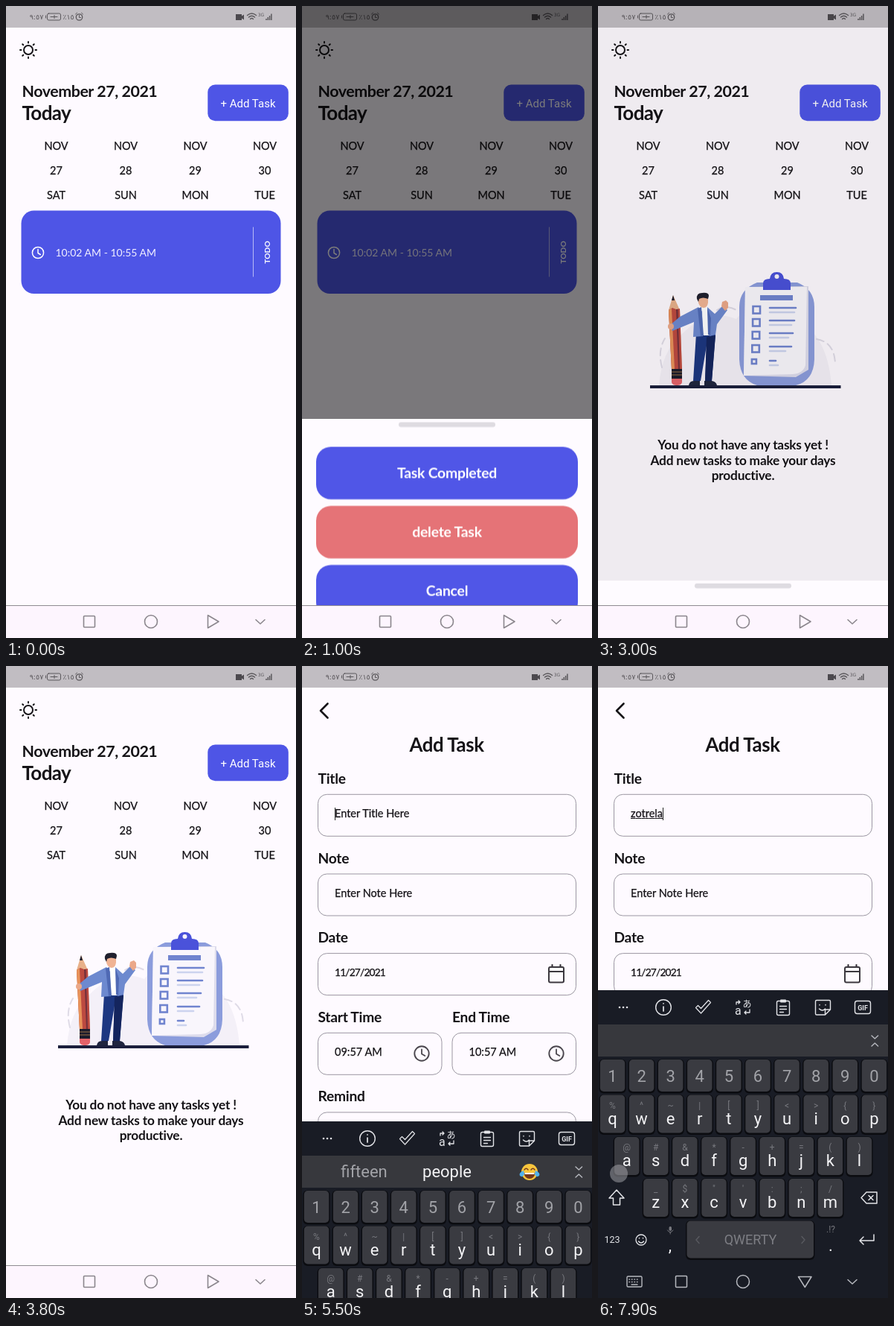
Write an HTML page that moves like this. It is 390 px wide and 848 px high and loops after 8000 ms.

```html
<!DOCTYPE html>
<html lang="en">
<head>
<meta charset="utf-8">
<title>Task planner</title>
<style>
html, body { margin: 0; width: 100%; height: 100%; overflow: hidden; background: #fefaff; }
svg { position: absolute; left: 0; top: 0; width: 390px; height: 848px; }
text, #typed { font-family: Lato, "Open Sans", sans-serif; font-size: 14.5px; }
text { white-space: pre; fill: #151317; }
.mid { text-anchor: middle; }
.bold { font-weight: 700; }
.body { stroke: #151317; stroke-width: .25px; }
.date { font-size: 21.4px; letter-spacing: -.44px; }
.today { font-size: 26px; letter-spacing: -.6px; }
.title { font-size: 25.8px; letter-spacing: -.4px; }
.label { font-size: 19.2px; letter-spacing: -.25px; }
.btn { font-size: 19.4px; letter-spacing: -.25px; fill: #fff; }
.empty { font-size: 17.3px; letter-spacing: -.2px; }
.num { font-size: 13.8px; letter-spacing: -.85px; }
.add { font: 15px Roboto, sans-serif; fill: #fff; }
.sys { font: 9.5px "DejaVu Sans", sans-serif; fill: #5b585c; }
.key { font: 22px Roboto, sans-serif; fill: #f4f4f6; }
.dim { fill: #a2a3a8; }
.hint { font: 12px Roboto, sans-serif; fill: #77787e; }
.line { fill: none; stroke-linecap: round; stroke-linejoin: round; }
.field { fill: none; stroke: #9b97a2; }

.loop { animation: 8s linear infinite; }
#scrim { animation-name: scrim; }
#sheet { animation-name: sheet; }
#card { animation-name: card; animation-timing-function: step-end; }
#none { animation-name: none-yet; animation-timing-function: step-end; }
#page { animation: rise 8s infinite, fade 8s infinite; }
#keys { animation-name: keys; }
.idle { animation-name: idle; animation-timing-function: step-end; }
#caret { animation-name: caret; animation-timing-function: step-end; }

@keyframes scrim {
  0%, 9.75% { opacity: 0; animation-timing-function: ease; }
  13.5% { opacity: 1; }
  34.375% { opacity: 1; animation-timing-function: ease-in-out; }
  38.45%, 100% { opacity: 0; }
}
@keyframes sheet {
  0%, 10.5% { transform: translateY(314px); animation-timing-function: cubic-bezier(0, 0, .2, 1); }
  15% { transform: none; }
  34.375% { transform: none; animation-timing-function: ease-in-out; }
  38.45%, 100% { transform: translateY(314px); }
}
@keyframes card { 0% { opacity: 1; } 34.75%, 100% { opacity: 0; } }
@keyframes none-yet { 0% { opacity: 0; } 34.75%, 100% { opacity: 1; } }
@keyframes rise {
  0%, 52% { transform: translateY(212px); animation-timing-function: cubic-bezier(.4, 0, .2, 1); }
  57%, 100% { transform: none; }
}
@keyframes fade {
  0%, 52% { opacity: 0; animation-timing-function: ease-in; }
  57%, 100% { opacity: 1; }
}
@keyframes keys {
  0%, 67.25% { transform: translateY(414px); animation-timing-function: ease-out; }
  71%, 100% { transform: none; }
}
@keyframes idle { 0% { opacity: 1; } 84.5%, 100% { opacity: 0; } }
@keyframes caret {
  0% { opacity: 0; } 65.6% { opacity: 1; } 71.9% { opacity: 0; }
  78.1%, 100% { opacity: 1; }
}

#typed { position: absolute; left: 44px; top: 188px; height: 20px; line-height: 20px; color: #151317; white-space: nowrap; -webkit-text-stroke: .25px #151317; }
#word { text-decoration: underline; }
#word span { font-size: 0; }
#caret { display: inline-block; width: 1.3px; height: 17px; background: #222; vertical-align: -4px; }
.tap { position: absolute; width: 24px; height: 24px; margin: -12px; border-radius: 50%; background: rgba(170, 170, 176, .5); opacity: 0; }
</style>
</head>
<body>
<svg viewBox="0 0 390 848">
  <rect width="390" height="848" fill="#fefaff"/>

  <g id="home">
    <g class="line" stroke="#151317" stroke-width="2">
      <circle cx="30" cy="59" r="6"/>
      <g id="rays"></g>
    </g>
    <text class="bold date" x="21.5" y="122">November 27, 2021</text>
    <text class="bold today" x="21.5" y="152.5">Today</text>
    <rect x="271.300" y="105.500" width="108.500" height="48.700" rx="10" fill="#4e55e6"/>
    <text class="add mid" x="325.5" y="135.5">+ Add Task</text>
    <g id="days"></g>

    <g id="card" class="loop">
      <rect x="20.500" y="274.500" width="349" height="111.500" rx="17" fill="#4e55e6"/>
      <g class="line" stroke="#fff" stroke-width="1.5">
        <circle cx="43" cy="331" r="7.6"/><path d="M43 326.500v5l3.300 2"/>
        <path d="M332.500 297v66" stroke-width="1" opacity=".6"/>
      </g>
      <text x="66.500" y="336" style="font-size:14px;fill:#f3f1ff">10:02 AM - 10:55 AM</text>
      <text class="bold mid" transform="translate(354.500 330.500) rotate(-90)" style="font-size:10.300px;fill:#fff">TODO</text>
    </g>

    <g id="none" class="loop">
      <path d="M82 509Q86 462 112 441Q148 404 186 420Q222 372 262 420Q308 436 314 509Z" fill="#f4f0f8"/>
      <path class="line" d="M86 485Q80 462 90 446M160 408q12-8 26 0M294 447q24 4 25 33" stroke="#dfdbe7" stroke-width="2" stroke-dasharray="10 6"/>
      <!-- clipboard -->
      <path d="M214 371H268Q291 380 291 404V474Q290 503 266 509H214Q191 502 190 474V404Q190 380 214 371Z" fill="#8b9cdc"/>
      <path d="M198 377L283 376V488L266 498L196 496Z" fill="#dddcec"/>
      <path d="M198 377H281L279 482Q276 493 262 494L196 496Z" fill="#f9f6fc"/>
      <path d="M222 381V372Q222 366 231 366Q232 357 240.500 357T250 366Q259 366 259 372V381Z" fill="#4a52da"/>
      <circle cx="240.500" cy="363" r="3" fill="#f7f4fb"/>
      <rect x="218" y="388" width="44" height="7" fill="#7084cf"/>
      <g id="checks"></g>
      <!-- pencil -->
      <path d="M101 388L95 408L99 488H113L110 408Z" fill="#e8b08a"/>
      <path d="M95 408l5-3 5 2 5-1 3 82H99Z" fill="#bd4a40"/>
      <path d="M95 408l4-2 4 82h-4Z" fill="#e8935a"/>
      <path d="M105 407h2.500l2.500 81h-2Z" fill="#73303c"/>
      <path d="M101 388l-2 7h4ZM99 487h14v13H99Z" fill="#1c1c2c"/>
      <path d="M99 495h14M99 491h14" stroke="#b98449" stroke-width=".8"/>
      <path d="M99 500h14v5q-1 4-7 4t-7-4Z" fill="#e4646a"/>
      <!-- figure -->
      <path d="M132 440H158L153 503H144L146 456L138 503H128Z" fill="#1d3781"/>
      <path d="M146 444l12-2-5 61h-9Z" fill="#14255e"/>
      <path d="M122 509q1-6 7-6h8v6ZM143 509v-6h10q6 1 7 6Z" fill="#20263f"/>
      <path d="M136 405h12l2 37h-14Z" fill="#fff"/>
      <path d="M135 404L110 417L97 428L100 436L129 424L128 444L141 443L140 410ZM147 404L157 413L168 402L174 408L160 427L158 441L150 443Z" fill="#6d89cf"/>
      <path d="M139 404l3 38-4 1-4-37ZM147 405l5 14-1 23-3-1Z" fill="#4f69b4"/>
      <circle cx="98" cy="430" r="4" fill="#eba889"/>
      <path d="M166 403l1-6 5-2 3 3v7l-4 4Z" fill="#eba889"/>
      <path d="M135 390h13v8q-1 7-6 7t-7-7Z" fill="#f0b394"/>
      <path d="M133 393q-1-8 7-8 9-1 9 4l-1 4q-7-3-12 0l-1 4Z" fill="#20202e"/>
      <path d="M70 511H326.500" stroke="#1b1f3c" stroke-width="4"/>
      <g class="bold mid">
        <text class="empty" x="195" y="595">You do not have any tasks yet !</text>
        <text class="empty" x="195" y="615.500">Add new tasks to make your days</text>
        <text class="empty" x="195" y="636">productive.</text>
      </g>
    </g>
  </g>

  <g id="page"></g>

  <g id="status">
    <rect width="390" height="29" fill="#c1bdc2"/>
    <text class="sys mid" x="41" y="18">٩:٥٧</text>
    <text class="sys mid" x="84" y="18">٪١٥</text>
    <g class="line" stroke="#5b585c" stroke-width="1">
      <rect x="55.500" y="10" width="18" height="9" rx="2"/>
      <path d="M53.500 13v3M60 14.500h9M65 12.500v4"/>
      <circle cx="98.500" cy="15" r="4.200" stroke-width="1.300"/>
      <path d="M98.500 12.500v3h2M93.500 11l2-1.800M103.500 11l-2-1.800"/>
      <path d="M324.500 12.500q6-5 12 0M326.500 15q4-3.500 8 0M328.500 17.500q2-2 4 0" stroke-width="1.400"/>
      <path d="M350 19v-2M352.300 19v-4M354.600 19v-6M356.900 19v-8.500" stroke-width="1.500" stroke-linecap="butt"/>
    </g>
    <path d="M309 11h8v2.500l3-2v7l-3-2V19h-8Z" fill="#4c494e"/>
    <text class="sys mid" x="343" y="14" style="font-size:6px">3G</text>
  </g>

  <rect id="scrim" class="loop" width="390" height="805" fill="#000" fill-opacity=".54"/>

  <g transform="translate(0 491)">
    <g id="sheet" class="loop">
      <rect width="390" height="330" fill="#fefbff"/>
      <rect x="130" y="4" width="130" height="6.500" rx="3.200" fill="#dedbe1"/>
      <g id="choices"></g>
    </g>
  </g>

  <g id="nav">
    <rect y="804" width="390" height="44" fill="#fdf5fe"/>
    <path d="M0 804.500H390" stroke="#8f8b92"/>
    <g class="line" stroke="#8b868d" stroke-width="1.600">
      <rect x="104.500" y="818.500" width="15" height="15" rx="1"/>
      <circle cx="195" cy="826" r="8.500"/>
      <path d="M271.500 817.500V834.500L286 826ZM336 823.500l6 5.500 6-5.500"/>
    </g>
  </g>

  <g id="keys" class="loop"></g>
</svg>
<div id="typed"><span id="word"></span><span id="caret" class="loop"></span></div>

<script>
const LOOP = 8000;
const $ = id => document.getElementById(id);
const text = (x, y, s, cls = '') => `<text x="${x}" y="${y}" class="${cls}">${s}</text>`;
const box = (x, y, w, h, r, attr) => `<rect x="${x}" y="${y}" width="${w}" height="${h}" rx="${r}" ${attr}/>`;
const line = (d, color, w = 1.5) => `<path class="line" d="${d}" stroke="${color}" stroke-width="${w}"/>`;
const ring = (x, y, r, color, w = 1.5) => `<circle class="line" cx="${x}" cy="${y}" r="${r}" stroke="${color}" stroke-width="${w}"/>`;

// Home
$('rays').innerHTML = [...Array(8).keys()].map(i =>
  `<path d="M30 49.500v-1.500" transform="rotate(${i * 45} 30 59)"/>`).join('');
$('days').innerHTML = ['SAT', 'SUN', 'MON', 'TUE'].map((day, i) => {
  const x = 67.5 + i * 93.5;
  return text(x, 192.5, 'NOV', 'body mid') + text(x, 226, 27 + i, 'body mid') + text(x, 259, day, 'body mid');
}).join('');
$('checks').innerHTML = [402, 419, 436, 454, 473].map((y, i) => {
  const s = i < 4 ? 9.5 : 6, w = i < 4 ? 35 - i * 2 : 8;
  return box(208.5 - i * .4, y + 1, s, s, 0, 'fill="none" stroke="#7084cf" stroke-width="2.600"')
    + line(`M231 ${y + 3}h${w}`, '#7084cf', 2.6) + line(`M231 ${y + 9}h${i < 4 ? 33 - i * 4 : 11}`, '#ccd3ee', 2.6);
}).join('');

// Bottom sheet
$('choices').innerHTML = ['Task Completed', 'delete Task', 'Cancel'].map((s, i) => {
  const y = 37 + i * 79.2;
  return box(19, y, 352, 70.5, 20, `fill="${i === 1 ? '#e57377' : '#5056e7'}"`)
    + text(195, y + 42, s, 'bold btn mid');
}).join('');

// Form
const clock = (x, y) => ring(x, y, 9.7, '#4b474e', 1.9) + line(`M${x} ${y - 5.5}v6l4.300 2.600`, '#4b474e', 1.8);
const arrow = (x, y) => line(`M${x - 7} ${y - 3.5}l7 7 7-7`, '#77727a', 2.6);
const field = (label, y, value, icon = '', x = 21.5, w = 347, cls = '') =>
  text(x, y + 6.8, label, 'bold label') + box(x, y + 21.3, w, 56, 12, 'class="field"')
  + text(x + 22.5, y + 52, value, 'body ' + cls) + icon;
const calendar = box(332, 404, 20, 20.5, 2, 'class="line" stroke="#3c383f" stroke-width="2"')
  + line('M332 410h20M336.500 401v3M347.500 401v3', '#3c383f', 2.2);
$('page').innerHTML = box(0, 0, 390, 1020, 0, 'fill="#fefaff"')
  + line('M34.500 50.500L25 60l9.500 9.500', '#151317', 2.6)
  + text(194.5, 115, 'Add Task', 'bold title mid')
  + field('Title', 151, 'Enter Title Here', '', 21.5, 347, 'loop idle')
  + field('Note', 257.7, 'Enter Note Here')
  + field('Date', 364.3, '11/27/2021', calendar, 21.5, 347, 'num')
  + field('Start Time', 471, '09:57 AM', clock(161, 520), 21.5, 166.5)
  + field('End Time', 471, '10:57 AM', clock(342, 520), 202, 166.5)
  + field('Remind', 577.6, '5 Minute Early', arrow(344, 627))
  + field('Repeat', 684.3, 'None', arrow(344, 733))
  + text(21.5, 801.5, 'Color', 'bold label')
  + box(260, 788, 109, 49, 10, 'fill="#4e55e6"');

// Keyboard
const spots = {};
const ink = '#e3e4e8', soft = '#b7b9bf';
const cap = (x, y, w, h) => box(x - 1.4, y - .6, w + 2.8, h + 3, 6, 'fill="#0b0c10"') + box(x, y, w, h, 5, 'fill="#3a3b41"');
const escape = s => s.replace('&', '&amp;').replace('<', '&lt;');
const row = (chars, hints, x0, y, h) => [...chars].map((c, i) => {
  const x = x0 + i * 39.1;
  spots[c] = [x, y + h / 2 + 6];
  return cap(x - 16.7, y, 33.4, h) + (hints[i]
    ? text(x, y + 18, escape(hints[i]), 'hint mid') + text(x, y + 39, c, 'key mid')
    : text(x, y + 29.5, c, 'key dim mid'));
}).join('');
const tools = [29, 34, 39].map(x => `<circle cx="${x}" cy="458" r="1.300" fill="${ink}"/>`).join('')
  + ring(88, 458, 10.3, ink, 1.4) + line('M88 457v6M88 452.800v.2', ink, 1.7)
  + line('M131.500 458.500l3-3 4 4 10-11 3 3-13 14.500Z', ink, 1.2)
  + `<text x="184" y="467.500" style="font:16px Roboto,sans-serif;fill:${ink}">a</text>`
  + `<text x="194.500" y="458" style="font:12px 'Noto Sans CJK JP','Noto Sans CJK',sans-serif;fill:${ink}">あ</text>`
  + line('M186 454v-3h5m-2-2 2 2-2 2M204 461v4h-7m2-2-2 2 2 2', ink, 1.3)
  + box(240.5, 449.5, 17, 19, 2, `class="line" stroke="${ink}" stroke-width="1.400"`)
  + box(245, 447.5, 8, 4, 1, `fill="${ink}"`) + line('M244.500 456.500h9M244.500 460.500h9M244.500 464.500h5', ink, 1.3)
  + line('M294 448.500h17q1.500 0 1.500 1.500v11l-7 7h-11.500q-1.500 0-1.500-1.500v-16.500q0-1.500 1.500-1.500M312 461h-6.500v6.500M297.500 460q4.500 4 8 0M298 454.500v.5M306 454.500v.5', ink, 1.4)
  + box(345.5, 449.5, 21, 17, 3, `class="line" stroke="${ink}" stroke-width="1.400"`)
  + `<text class="mid" x="356" y="461.500" style="font:700 9px Roboto,sans-serif;fill:${ink}">GIF</text>`;
const laugh = `<circle cx="306" cy="503" r="11" fill="#f8c63d"/>
  <path d="M298.500 504h15q-1 8-7.500 8t-7.500-8Z" fill="#74391f"/><path d="M299.500 504h13v2h-13Z" fill="#fff"/>`
  + line('M299 500q2.500-3.500 5 0M308 500q2.500-3.500 5 0', '#74391f', 1.4)
  + '<path d="M298 501q-7 3-5 7 4 3 6-2ZM314 501q7 3 5 7-4 3-6-2Z" fill="#4fb2ee"/>';
const list = s => s.split(' ');
$('keys').innerHTML = box(0, 435, 390, 414, 0, 'fill="#191c25"')
  + box(0, 481, 390, 43, 0, 'fill="#37383d"')
  + tools
  + '<g class="loop idle">' + text(83.5, 510, 'fifteen', 'key dim mid') + text(195, 510, 'people', 'key mid') + laugh + '</g>'
  + line('M368 496l4.300 4 4.300-4M368 510l4.300-4 4.300 4', soft, 1.4)
  + row('1234567890', [], 19.5, 528, 43)
  + row('qwertyuiop', list('% ^ ~ | [ ] < > { }'), 19.5, 575.5, 51)
  + row('asdfghjkl', list('@ # & * - + = ( )'), 38.7, 632, 51)
  + row('zxcvbnm', list('_ $ " \' : ; /'), 77.8, 688, 51)
  + line('M25 703l10 11h-5.500v9h-9v-9H15Z', ink, 1.5)
  + line('M361 706h14v15h-14l-7-7.500ZM364 710.500l6 6M370 710.500l-6 6', ink, 1.5)
  + cap(119.5, 744.5, 170.5, 50)
  + `<text class="mid" x="205" y="776" style="font:18px Roboto,sans-serif;fill:#7d7e84">QWERTY</text>`
  + line('M136 765.500l-4 4.500 4 4.500M274 765.500l4 4.500-4 4.500', '#595a60', 1.4)
  + `<text class="mid" x="19" y="774" style="font:12.500px Roboto,sans-serif;fill:${ink}">123</text>`
  + ring(58, 770, 7, ink, 1.3) + line('M54.500 772q3.500 4 7 0M55.500 767.500v.4M60.500 767.500v.4', ink, 1.4)
  + box(95.5, 752, 3.5, 6, 1.7, 'fill="#77787e"') + line('M93.500 757q3.700 6 7.400 0M97.200 760v2', '#77787e', 1)
  + text(97, 785, ',', 'key mid') + text(313, 785, '.', 'key mid') + text(313, 760, '.!?', 'hint mid')
  + line('M371 763v8h-19m5-5-5 5 5 5', ink, 1.5)
  + box(39, 819, 20, 14, 1.5, `class="line" stroke="${soft}" stroke-width="1.400"`)
  + line('M42 823h14M42 826.500h14', soft, 1.6).replace('/>', ' stroke-dasharray=".500 3"/>') + line('M45 830h8', soft, 1.4)
  + box(104.5, 818.5, 15, 15, 1, `class="line" stroke="${soft}" stroke-width="1.500"`)
  + ring(195, 826, 8.5, soft) + line('M269.500 819.500h17.500l-8.700 14ZM336 823.500l6 5.500 6-5.500', soft);

// Taps and typing
const cycle = (el, frames) => el.animate(frames, { duration: LOOP, iterations: Infinity });
const tap = (t, x, y) => {
  const dot = document.createElement('div');
  dot.className = 'tap';
  dot.style.left = x + 'px';
  dot.style.top = y + 'px';
  document.body.append(dot);
  const at = (ms, opacity) => ({ opacity, offset: ms / LOOP });
  const steps = [at(0, 0), at(t - 40, 0), at(t, 1), at(t + 150, 1)];
  if (t + 260 < LOOP) steps.push(at(t + 260, 0));
  cycle(dot, [...steps, at(LOOP, 0)]);
};
tap(500, 250, 335);
tap(2640, 215, 648);
tap(3850, 330, 134);
tap(4930, 160, 202);
tap(6090, 245, 763);

const times = [6760, 6940, 7110, 7280, 7450, 7640, 7800];
[...'zotrela'].forEach((c, i) => {
  const span = document.createElement('span');
  span.textContent = c;
  $('word').append(span);
  const easing = 'step-end';
  cycle(span, [
    { fontSize: '0px', offset: 0, easing },
    { fontSize: '14.5px', offset: times[i] / LOOP, easing },
    { fontSize: '14.5px', offset: 1 }
  ]);
  const [x, y] = spots[c];
  tap(times[i], x - 11, y + 17);
});
</script>
</body>
</html>
```
